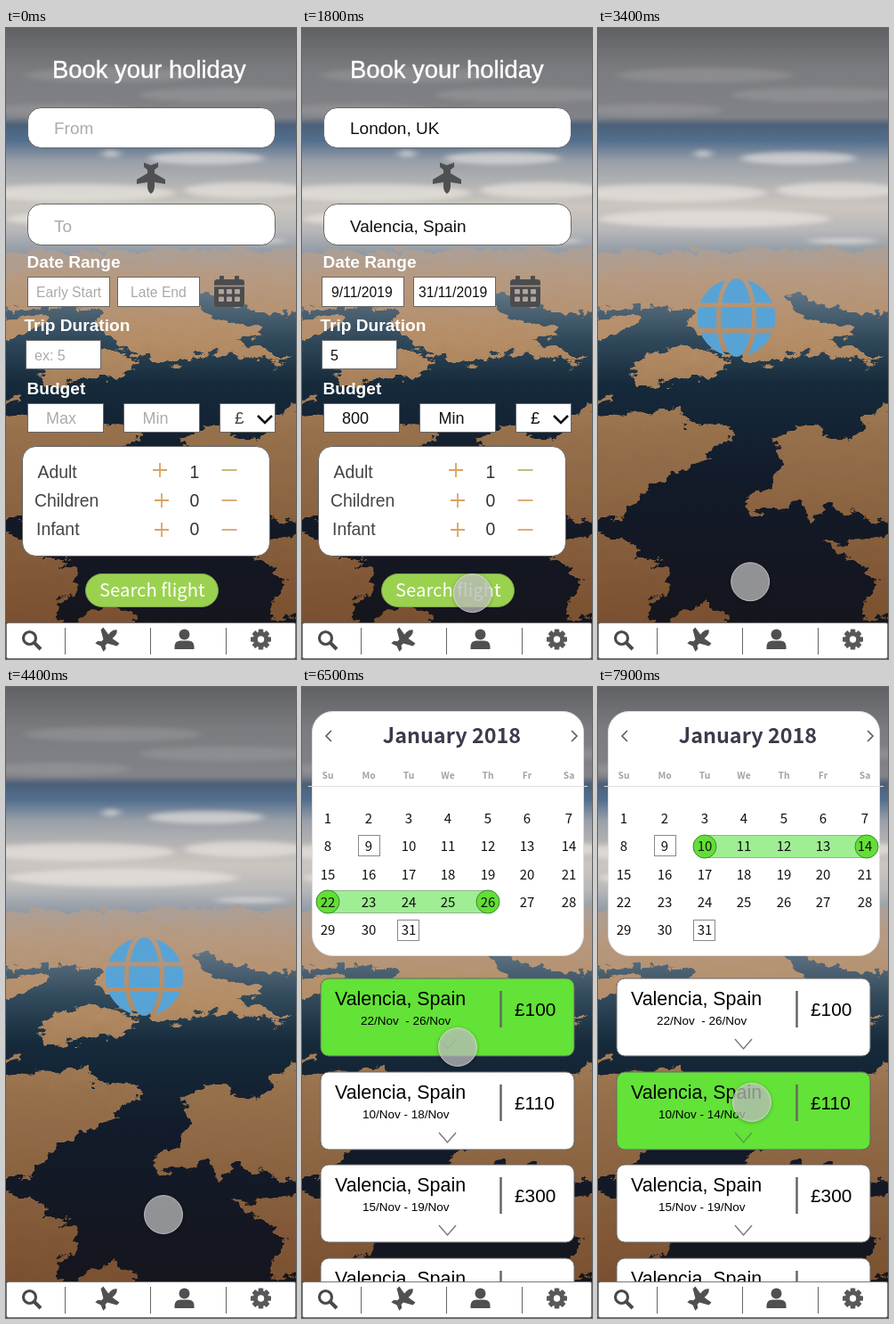
Animation, 326 px wide and 708 px high, one loop 8000 ms. Source, as an HTML page:

```html
<!DOCTYPE html>
<html lang="en">
<head>
<meta charset="utf-8">
<title>Holiday booking</title>
<style>
html, body { margin: 0; width: 100%; height: 100%; overflow: hidden; }
svg { display: block; width: 326px; height: 708px; font-family: "Liberation Sans", Arial, sans-serif; }
.source { font-family: "Noto Sans CJK JP", "Noto Sans CJK SC", "Noto Sans CJK", "Open Sans", sans-serif; }
</style>
</head>
<body>
<svg viewBox="0 0 326 708" xmlns="http://www.w3.org/2000/svg">
  <defs>
    <linearGradient id="sky" x1="0" y1="0" x2="0" y2="667" gradientUnits="userSpaceOnUse">
      <stop offset="0" stop-color="#606165"/><stop offset=".07" stop-color="#7b7c80"/>
      <stop offset=".15" stop-color="#828388"/><stop offset=".163" stop-color="#4b6079"/>
      <stop offset=".19" stop-color="#536f8e"/><stop offset=".225" stop-color="#9aa0a8"/>
      <stop offset=".3" stop-color="#ccc6bf"/><stop offset=".34" stop-color="#b8b8ba"/>
      <stop offset=".37" stop-color="#98a0a9"/><stop offset=".46" stop-color="#566b7b"/>
      <stop offset=".52" stop-color="#324b5c"/><stop offset=".6" stop-color="#152a3b"/>
      <stop offset=".75" stop-color="#121b2a"/><stop offset="1" stop-color="#15151d"/>
    </linearGradient>
    <linearGradient id="soil" x1="0" y1="245" x2="0" y2="667" gradientUnits="userSpaceOnUse">
      <stop offset="0" stop-color="#aaa09a"/><stop offset=".08" stop-color="#b69a82"/>
      <stop offset=".25" stop-color="#b58d66"/><stop offset=".5" stop-color="#96704c"/>
      <stop offset="1" stop-color="#7a5030"/>
    </linearGradient>
    <filter id="coast" x="-5%" y="-5%" width="110%" height="110%">
      <feTurbulence type="fractalNoise" baseFrequency=".06 .09" numOctaves="4" seed="4" result="noise"/>
      <feDisplacementMap in="SourceGraphic" in2="noise" scale="22" xChannelSelector="R" yChannelSelector="G"/>
    </filter>
    <filter id="haze" x="-20%" y="-60%" width="140%" height="220%"><feGaussianBlur stdDeviation="5 2.5"/></filter>
    <filter id="soft" x="-30%" y="-30%" width="160%" height="160%"><feGaussianBlur stdDeviation="2"/></filter>
    <clipPath id="stage"><rect width="326" height="667"/></clipPath>
    <mask id="meridians" maskUnits="userSpaceOnUse" x="105" y="275" width="100" height="100">
      <circle cx="155.5" cy="325" r="44" fill="#fff"/>
      <g fill="none" stroke="#000" stroke-width="5">
        <path d="M108 311H204M108 339.5H204"/><ellipse cx="155.5" cy="325" rx="20" ry="47"/>
      </g>
    </mask>
    <path id="plane" d="M0 18Q-4 15-4 10V5L-16 7V2L-4-5V-9L-8-12V-17L0-14 8-17V-12L4-9V-5L16 2V7L4 5V10Q4 15 0 18Z" fill="#505052"/>
  </defs>
  <g clip-path="url(#stage)">
    <rect width="326" height="667" fill="url(#sky)"/>
    <g filter="url(#haze)">
      <g fill="#f1ece6" opacity=".6">
        <ellipse cx="225" cy="146" rx="65" ry="7"/><ellipse cx="118" cy="141" rx="10" ry="4"/>
        <ellipse cx="80" cy="185" rx="110" ry="10"/><ellipse cx="270" cy="182" rx="70" ry="9"/>
        <ellipse cx="130" cy="214" rx="130" ry="10"/><ellipse cx="275" cy="239" rx="40" ry="3"/>
      </g>
      <g fill="#a0a0a2" opacity=".45">
        <ellipse cx="120" cy="53" rx="100" ry="8"/><ellipse cx="250" cy="75" rx="100" ry="8"/>
        <ellipse cx="60" cy="92" rx="80" ry="7"/>
      </g>
    </g>
    <g fill="url(#soil)" filter="url(#coast)">
      <path d="M-15 252L340 247V324L280 318 245 308 222 295 215 300 228 325 285 335 290 345 260 352 318 372 310 378 255 366 215 365 195 378 140 365 112 345 100 335 108 318 60 312-15 318Z"/>
      <path d="M-15 326L48 324 30 340-15 354ZM35 388L60 362 115 358 150 372 140 388 95 396 50 403ZM-15 418L18 413 10 421-15 425Z"/>
      <path d="M-15 440L50 430 90 427 100 445 150 446 153 460 125 472 130 480 80 500 40 530 20 552-15 552Z"/>
      <path d="M165 530L190 515 205 490 200 465 210 450 248 447 262 462 290 460 305 432 340 422V560L280 545 265 535 240 553 228 530 175 545Z"/>
      <path d="M-15 560L40 578 42 592 80 605 78 630 60 645 65 680H-15ZM80 660L110 646 145 655 140 680H80ZM252 577L340 570V658L295 662 300 640 315 625 290 600Z"/>
    </g>
  </g>
  <g id="form"></g>
  <g id="loader"><circle cx="155.5" cy="325" r="44" fill="#58a3d6" mask="url(#meridians)"/></g>
  <g id="results"></g>
  <g id="nav"></g>
  <g id="pointer">
    <circle r="22" cy="1" fill="#000" opacity=".25" filter="url(#soft)"/>
    <circle r="21.5" fill="#d0d0d0" fill-opacity=".68" stroke="#e4e4e4" stroke-opacity=".7"/>
  </g>
</svg>
<script>
const LOOP = 8000;
const $ = id => document.getElementById(id);
const text = (x, y, size, str, attrs = '') =>
  `<text x="${x}" y="${y}" font-size="${size}" xml:space="preserve" ${attrs}>${str}</text>`;
const box = (x, y, w, h, rx = 0, attrs = 'fill="#fff" stroke="#666"') =>
  `<rect x="${x + .5}" y="${y + .5}" width="${w - 1}" height="${h - 1}" rx="${rx}" ${attrs}/>`;
const line = (d, color, width) =>
  `<path d="${d}" fill="none" stroke="${color}" stroke-width="${width}"/>`;
const MIDDLE = 'text-anchor="middle"';

function calendarIcon() {
  let cells = '';
  for (let i = 0; i < 6; i++) {
    cells += `<rect x="${239 + i % 3 * 9}" y="${293 + (i / 3 | 0) * 8.5}" width="6" height="5.5" rx="1" fill="#b0a49a"/>`;
  }
  return `<g fill="#4c4c4e"><rect x="234" y="282" width="34" height="31" rx="3.5"/>
    <rect x="240" y="278" width="5" height="9" rx="1"/><rect x="257" y="278" width="5" height="9" rx="1"/></g>
    ${line('M234 289.5H268', '#a59a92', 1.5)}${cells}`;
}

function formView(filled) {
  const ink = filled ? 'fill="#111"' : 'fill="#aaa"';
  const field = (x, y, size, hint, value) => text(x, y, size, filled ? value : hint, ink);
  const label = (x, y, str) => text(x, y, 19.1, str, 'fill="#fff" font-weight="bold"');
  const shift = filled ? 2 : 0;
  const people = [['Adult', 35.5, 173, 496, 1], ['Children', 32, 175, 530, 0], ['Infant', 34, 175, 563, 0]];
  return text(52 + shift, 56, 27.4, 'Book your holiday', 'fill="#fff" stroke="#fff" stroke-width=".4"') +
    box(24, 89, 279, 46, 15) + field(54, 119, 19, 'From', 'London, UK') +
    '<use href="#plane" transform="translate(163 168)"/>' +
    box(24, 197, 279, 47, 15) + field(54, 229, 19, 'To', 'Valencia, Spain') +
    label(23.5, 269, 'Date Range') +
    box(24 - shift, 279, 93, 34) + field(filled ? 33 : 34, 302, 15.7, 'Early Start', '9/11/2019') +
    box(125, 279, 93, 34) + field(filled ? 131 : 140, 302, 15.7, 'Late End', '31/11/2019') +
    calendarIcon() +
    label(20.5, 340, 'Trip Duration') + box(22, 350, 85, 33) + field(32, 373, 16, 'ex: 5', '5') +
    label(23.5, 411, 'Budget') +
    box(24, 421, 86, 33) + field(45, 444, 18, 'Max', '800') +
    box(132, 421, 86, 33) + field(153.5, 444, 18, 'Min', 'Min') +
    box(240, 421, 63, 33) + text(257, 444, 19, '£', `fill="${filled ? '#111' : '#444'}"`) +
    line('M283 435L291 443 299 435', '#111', 2.6) +
    box(18, 469, 279, 124, 15) +
    people.map(([name, x, plus, y, count], i) =>
      text(x, 505 + i * 32, 19.4, name, 'fill="#444"') +
      text(212, 505 + i * 32, 19.4, count, `${MIDDLE} fill="#333"`) +
      line(`M${plus - 8} ${y}h16M${plus} ${y - 8}v16`, '#dba35f', 1.8) +
      line(`M242.5 ${y}h17`, i ? '#dba36a' : '#b9b56a', 1.8)).join('') +
    box(89, 612, 150, 38, 18.5, 'fill="#9ad250" stroke="#7fa34a"') +
    text(105, 638, 20.3, 'Search flight', 'class="source" fill="#fff"');
}

const columns = [29, 75, 120, 164, 209, 253, 300];
const cards = [
  [327, '22/Nov  - 26/Nov', '£100'], [432, '10/Nov - 18/Nov', '£110'],
  [536, '15/Nov - 19/Nov', '£300'], [641, '20/Nov - 24/Nov', '£320']
];
const ranges = [[29, 209, 241], [120, 302, 179]];

function resultsView(selected) {
  let out = box(11, 27, 306, 275, 23, 'fill="#fff" stroke="#ddd"') +
    text(168.5, 63, 23.4, 'January 2018', `${MIDDLE} class="source" font-weight="bold" fill="#3b3b4d"`) +
    line('M33 49L27 55 33 61M303 49L309 55 303 61', '#555', 1.5) +
    line('M7 111.5H321', '#dcdfe3', 1);
  if (selected >= 0) {
    const [from, to, y] = ranges[selected];
    out += box(from - 13, y - 13, to - from + 26, 26, 13, 'fill="#9fee93" stroke="#91b58b"');
    for (const x of [from, to]) out += `<circle cx="${x}" cy="${y}" r="13" fill="#62df35" stroke="#40863a"/>`;
  }
  out += box(63, 166, 25, 24, 0, 'fill="none" stroke="#888"') + box(107, 261, 25, 24, 0, 'fill="none" stroke="#888"');
  ['Su', 'Mo', 'Tu', 'We', 'Th', 'Fr', 'Sa'].forEach((day, i) => {
    out += text(columns[i], 103, 10.3, day, `${MIDDLE} class="source" font-weight="bold" fill="#a0a2a8"`);
  });
  for (let day = 1; day <= 31; day++) {
    const row = (day - 1) / 7 | 0;
    out += text(columns[(day - 1) % 7], 153 + row * 31.3, 15, day, `${MIDDLE} class="source" fill="#111"`);
  }
  cards.forEach(([y, dates, price], i) => {
    const active = i === selected;
    const shown = active && i === 1 ? '10/Nov - 14/Nov' : dates;
    out += box(20.5, y - .5, 286, 88, 9, `fill="${active ? '#63e237' : '#fff'}" stroke="#666"`) +
      text(37, y + 29.5, 21.4, 'Valencia, Spain') +
      text(i ? 68 : 66, y + 52, 13.5, shown) +
      text(239, y + 41.5, 20.8, price) +
      line(`M223.5 ${y + 14}v41`, '#666', 2.5) +
      line(`M154 ${y + 68}l9.5 11 9.5 -11`, active ? '#55a146' : '#777', 1.4);
  });
  return out;
}

function navView() {
  const teeth = Array.from({ length: 8 }, (_, i) =>
    `<rect x="-2.8" y="-11.5" width="5.6" height="6" rx="1" transform="rotate(${i * 45})"/>`).join('');
  return `<rect y="667" width="326" height="41" fill="#333"/>` +
    box(0, 667, 326, 41, 2, 'fill="#fff" stroke="#777"') +
    line('M66.5 673V703M162.5 673V703M247.5 673V703', '#666', 1) +
    `<circle cx="26.5" cy="684.5" r="7" fill="none" stroke="#4a4a4c" stroke-width="3.2"/>` +
    line('M31.5 689.5L39 697', '#4a4a4c', 4) +
    '<use href="#plane" transform="translate(114.5 685.5) rotate(225) scale(.8)"/>' +
    `<g fill="#505052"><circle cx="200.5" cy="680.5" r="6"/>
      <path d="M189.5 697V693.5Q190 687.5 196 687.5H205Q211 687.5 211.5 693.5V697Z"/></g>
    <g transform="translate(286.5 686)" fill="#58585a">${teeth}<circle r="8.7"/><circle r="3.7" fill="#fff"/></g>`;
}

const path = [[200, 215, 610], [1000, 202, 632], [1500, 196, 634], [2700, 168, 635], [3300, 171, 622],
  [4400, 177, 592], [5000, 184, 406], [5200, 184, 406], [6500, 175, 404], [7300, 173, 466], [7900, 173, 466]];
const ramp = (t, start, length) => Math.min(1, Math.max(0, (t - start) / length));

function pointerAt(t) {
  let i = 0;
  while (i < path.length - 2 && t > path[i + 1][0]) i++;
  const [t0, x0, y0] = path[i], [t1, x1, y1] = path[i + 1];
  const p = ramp(t, t0, t1 - t0), k = p * p * (3 - 2 * p);
  return [x0 + (x1 - x0) * k, y0 + (y1 - y0) * k];
}

const states = {};
function setView(id, state, view) {
  if (states[id] === state) return;
  states[id] = state;
  $(id).innerHTML = view(state);
}
function fade(id, opacity) {
  $(id).setAttribute('opacity', opacity);
  $(id).style.display = opacity ? '' : 'none';
}

function render(t) {
  setView('form', t >= 1500, formView);
  setView('results', t < 5000 ? -1 : t < 7300 ? 0 : 1, resultsView);
  const loading = ramp(t, 2900, 250), loaded = ramp(t, 4500, 250);
  fade('form', 1 - loading);
  fade('loader', loading * (1 - loaded));
  fade('results', loaded);
  fade('pointer', ramp(t, 200, 200));
  $('pointer').setAttribute('transform', `translate(${pointerAt(t)})`);
}

$('nav').innerHTML = navView();
const start = performance.now();
function tick() {
  render((performance.now() - start) % LOOP);
  requestAnimationFrame(tick);
}
tick();
</script>
</body>
</html>
```
